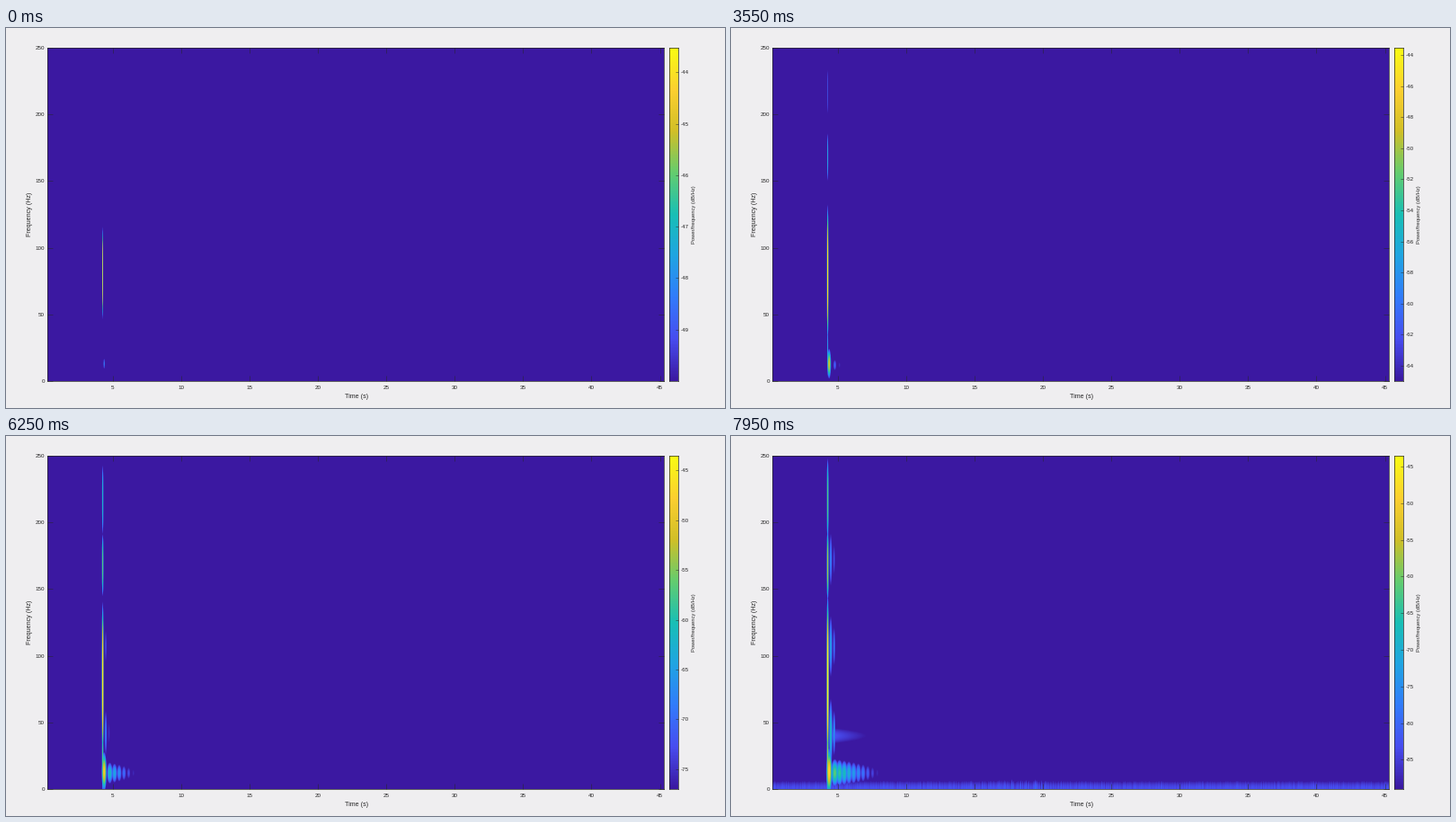
Write a matplotlib script that moves like this. It is 800x423 px and loops after 8000 ms.

```python
import numpy as np
import matplotlib.pyplot as plt
from matplotlib.animation import FuncAnimation
from matplotlib.colors import LinearSegmentedColormap

W, H, DPI = 800, 423, 64
LEFT, RIGHT, TOP, BOTTOM = 46, 732, 22, 393
INTERVAL, FRAMES = 50, 160
PEAK, FLOOR, DROP = -43.52, -50, 3
FINE = 3  # time samples per pixel
INK = "#262626"

# Times (ms) at which the colour floor falls by one drop
drops = np.interp(range(1, 14), [1, 3, 5, 8, 10, 13],
                  [1100, 2250, 3550, 5600, 6900, 7950])

cmap = LinearSegmentedColormap.from_list("parula", [
    (.232, .098, .632), (.281, .301, .941), (.196, .485, .989),
    (.125, .646, .888), (.096, .750, .712), (.391, .803, .435),
    (.820, .750, .154), (.989, .814, .189), (.977, .984, .081)])


def pt(px):
    return px * 72 / DPI


def lobe(x, f, cx, cf, level, wx, wf, power=2):
    """Bump in dB, 10 dB down at one width from its centre."""
    return level - 10 * (((x - cx) / wx) ** 2 + np.abs((f - cf) / wf) ** power)


def spectrum():
    """Power in dB over frequency rows and finely sampled time columns."""
    x = LEFT + (np.arange((RIGHT - LEFT) * FINE) + 0.5) / FINE
    rows = BOTTOM - TOP
    f = ((np.arange(rows) + 0.5) * 250 / rows)[:, None]

    # Low resonance, then the modes of the broadband click
    parts = [lobe(x, f, 109.2, 13, -48, 1.7, 8.8)]
    for cf, level, wf in [(81, -43.2, 40), (22, -56, 20),
                          (168, -55.5, 18.3), (217, -60.5, 22.2)]:
        parts.append(lobe(x, f, 107.6, cf, level, 0.65, wf, 3))

    # Ringing of the low resonance
    for k in range(10):
        parts.append(lobe(x, f, 115.5 + 5.25 * k, 12, -61 - 2.9 * k, 2.6, 6.4))

    # Echoes of the higher modes
    for n in range(3):
        for k in range(2):
            parts.append(lobe(x, f, 111 + 3.7 * k, 42 + 65 * n,
                              -68 - 4.3 * n - 6 * k, 1.4 - 0.2 * k, 18 - 4 * k))

    # Long tone at 40 Hz
    tone = -83 - 0.17 * (x - 116) - 0.18 * (f - 40) ** 2
    parts.append(np.where(x > 113, tone, -150))

    # Background hum, rougher in the middle
    rng = np.random.default_rng(4)
    noise = np.repeat(rng.normal(size=RIGHT - LEFT), FINE)
    rough = 0.5 + 0.8 * np.exp(-((x - 325) / 50) ** 2)
    parts.append(-83.2 + noise * rough - 0.17 * f ** 2)

    return np.max(np.broadcast_arrays(*parts), axis=0)


def shade(db, low):
    """Colour the field, then average down to one column per pixel."""
    rgba = cmap((db - low) / (PEAK - low), bytes=True)
    return rgba.reshape(len(db), -1, FINE, 4).mean(axis=2).astype(np.uint8)


field = spectrum()
lows = [FLOOR - DROP * k for k in range(len(drops) + 1)]
pictures = [shade(field, low) for low in lows]

plt.rcParams["font.family"] = "Liberation Sans"
fig = plt.figure(figsize=(W / DPI, H / DPI), dpi=DPI, facecolor="#efeef0")


def panel(left, right):
    ax = fig.add_axes([left / W, 1 - BOTTOM / H,
                       (right - left) / W, (BOTTOM - TOP) / H])
    for spine in ax.spines.values():
        spine.set(color=INK, linewidth=pt(0.7))
    return ax


def label(x, y, text, size, rotation=0):
    fig.text(x / W, 1 - y / H, text, fontsize=pt(size), color=INK,
             ha="center", va="center", rotation=rotation)


ax = panel(LEFT, RIGHT)
plot = ax.imshow(pictures[0], origin="lower", aspect="auto",
                 interpolation="nearest", extent=(0.238, 45.29, 0, 250))
ax.set_xticks(range(5, 50, 5))
ax.set_yticks(range(0, 300, 50))
ax.set_xlim(0.238, 45.29)
ax.set_ylim(0, 250)
ticks = dict(direction="in", color=INK, labelcolor=INK, labelsize=pt(6.2),
             width=pt(0.5))
ax.tick_params(axis="x", top=True, length=pt(6), pad=pt(4.5), **ticks)
ax.tick_params(axis="y", right=True, length=pt(6), pad=pt(3), **ticks)

bar_ax = panel(738, 747.6)
bar = bar_ax.imshow(np.linspace(0, 1, 256)[:, None], cmap=cmap,
                    origin="lower", aspect="auto", extent=(0, 1, FLOOR, PEAK))
bar_ax.set_xticks([])
bar_ax.yaxis.tick_right()
bar_ax.tick_params(axis="y", length=pt(3), pad=pt(2.8), **ticks)

label(390, 410, "Time (s)", 7.1)
label(27, 207, "Frequency (Hz)", 7.1, 90)
label(766, 207.5, "Power/frequency (dB/Hz)", 5.75, 90)


def update(frame):
    k = int(np.searchsorted(drops, frame * INTERVAL, "right"))
    low = lows[k]
    span = PEAK - low
    step = 1 if span < 11 else 2 if span < 23 else 5
    plot.set_data(pictures[k])
    bar.set_extent((0, 1, low, PEAK))
    levels = [v for v in range(low + 1, -43) if v % step == 0]
    bar_ax.set_yticks(levels, [str(v) for v in levels])
    bar_ax.set_ylim(low, PEAK)
    return plot, bar


anim = FuncAnimation(fig, update, frames=FRAMES, interval=INTERVAL,
                     init_func=lambda: update(0), repeat=True,
                     repeat_delay=0, blit=False)
plt.show()
```
